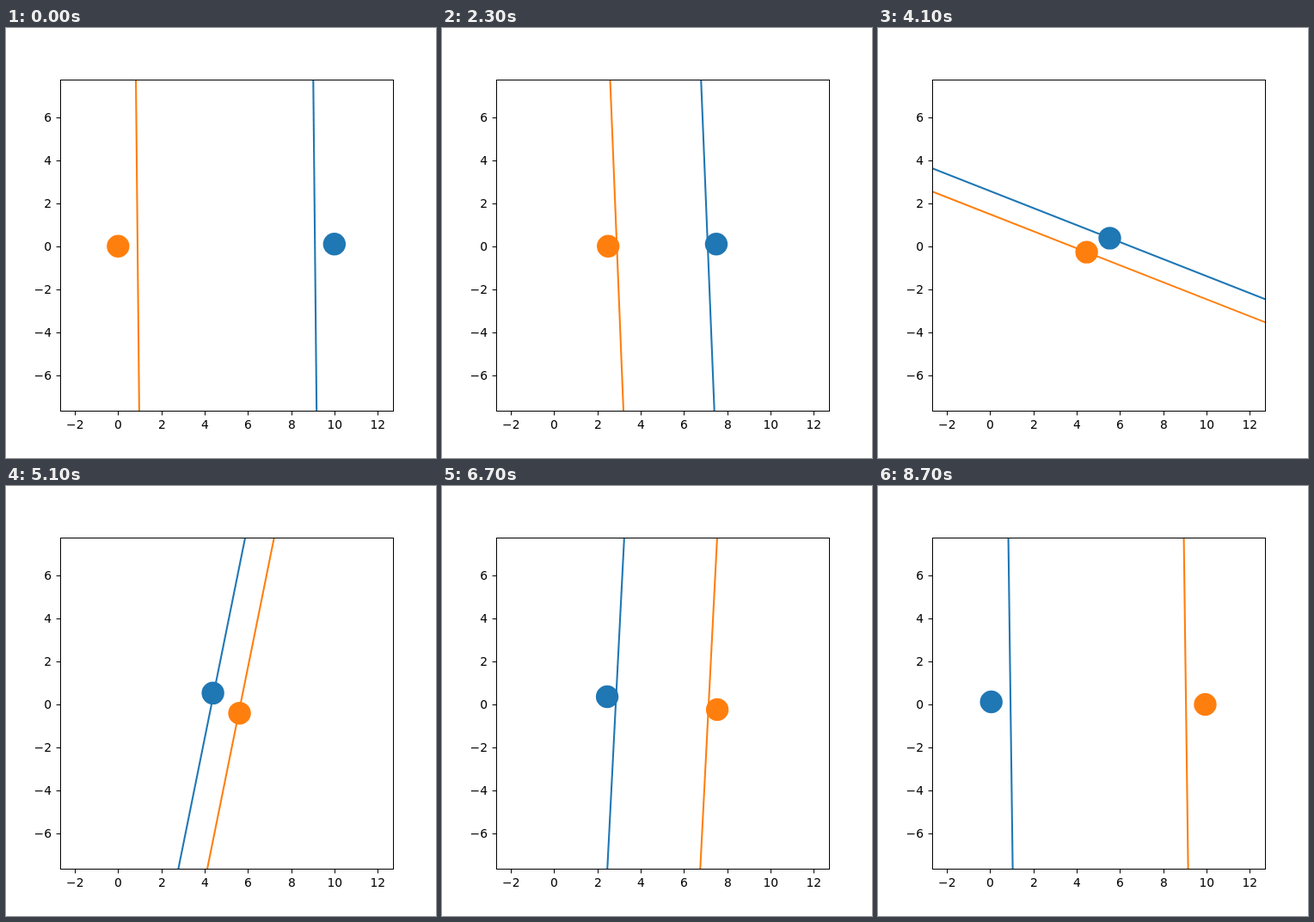
Write an HTML page with a canvas that moves like this. It is 500 px wide and 500 px high and loops after 8900 ms.

```html
<!DOCTYPE html>
<html lang="en">
<head>
<meta charset="utf-8">
<title>Two agents avoiding each other</title>
<style>
html, body { margin: 0; width: 100%; height: 100%; overflow: hidden; background: #fff; }
canvas { display: block; }
</style>
</head>
<body>
<canvas id="stage" width="500" height="500"></canvas>
<script>
const ctx = document.getElementById('stage').getContext('2d');
const BLUE = '#1f77b4', ORANGE = '#ff7f0e';
const STEPS = 42, FIRST = 500, STEP = 200, LOOP = FIRST + STEPS * STEP;
const SPEED = 0.25, HORIZON = 5, CONTACT = 0.1, REACH = 1;
const CENTER = [5, 0.05], GOAL = [10, 0];

const add = (a, b, k = 1) => [a[0] + k * b[0], a[1] + k * b[1]];
const mul = (a, k) => [a[0] * k, a[1] * k];
const dot = (a, b) => a[0] * b[0] + a[1] * b[1];
const det = (a, b) => a[0] * b[1] - a[1] * b[0];
const len = a => Math.hypot(...a);

// The speed limit is an octagon; each half-plane is dot(v, n) >= c
const limits = Array.from({ length: 8 }, (_, i) => {
  const a = (i + 0.5) * Math.PI / 4;
  return { n: [-Math.cos(a), -Math.sin(a)], c: -SPEED * Math.cos(Math.PI / 8) };
});

// Reciprocal avoidance line; the other agent mirrors this one through CENTER
function avoid(pos, vel) {
  const x = mul(add(CENTER, pos, -1), 2), v = mul(vel, 2);
  const d2 = dot(x, x), r2 = REACH * REACH;
  const near = mul(x, (1 - r2 / d2) / HORIZON);
  let n, u;
  if (d2 < r2 || dot(add(v, near, -1), near) < 0) {
    const t = d2 < r2 ? CONTACT : HORIZON;
    const w = add(v, x, -1 / t);
    n = mul(w, 1 / len(w));
    u = mul(n, REACH / t - len(w));
  } else {
    const leg = Math.sqrt(d2 - r2), s = det(v, x) < 0 ? -REACH : REACH;
    const side = mul([leg * x[0] + s * x[1], leg * x[1] - s * x[0]], 1 / d2);
    n = mul([side[1], -side[0]], Math.sign(s));
    u = mul(n, -dot(v, n));
  }
  const point = add(vel, u, 0.5);
  return { n, c: dot(point, n), at: add(pos, point) };
}

// Allowed velocity closest to the wanted one
function choose(want, planes) {
  const options = [want];
  planes.forEach((p, i) => {
    options.push(add(want, p.n, p.c - dot(want, p.n)));
    for (const q of planes.slice(i + 1)) {
      const d = det(p.n, q.n);
      if (Math.abs(d) > 1e-9)
        options.push([(p.c * q.n[1] - q.c * p.n[1]) / d, (p.n[0] * q.c - q.n[0] * p.c) / d]);
    }
  });
  const gap = v => len(add(v, want, -1));
  return options
    .filter(v => planes.every(p => dot(v, p.n) >= p.c - 1e-9))
    .sort((a, b) => gap(a) - gap(b))[0] || [0, 0];
}

function simulate() {
  const states = [];
  let pos = [0, 0], vel = [0, 0];
  for (let i = 0; i <= STEPS; i++) {
    const line = avoid(pos, vel);
    states.push({ pos, line });
    const way = add(GOAL, pos, -1), dist = len(way);
    vel = choose(mul(way, Math.min(SPEED, dist) / dist), [line, ...limits]);
    pos = add(pos, vel);
  }
  return states;
}

const px = ([x, y]) => [130.35 + 25.15 * x, 253.75 - 25 * y];
const mirror = p => add(mul(CENTER, 2), p, -1);

function disc(p, color) {
  ctx.fillStyle = color;
  ctx.beginPath();
  ctx.arc(...px(p), 13.2, 0, 2 * Math.PI);
  ctx.fill();
}

function stroke(a, b, color, width) {
  ctx.strokeStyle = color;
  ctx.lineWidth = width;
  ctx.beginPath();
  ctx.moveTo(...a);
  ctx.lineTo(...b);
  ctx.stroke();
}

function longLine(p, n, color) {
  const along = [-n[1], n[0]];
  stroke(px(add(p, along, -50)), px(add(p, along, 50)), color, 2.08);
}

function axes() {
  ctx.strokeStyle = ctx.fillStyle = '#000';
  ctx.lineWidth = 1;
  ctx.strokeRect(63.5, 60.5, 387, 385);
  ctx.font = '13.89px "DejaVu Sans", sans-serif';
  const label = v => String(v).replace('-', '\u2212');
  ctx.textAlign = 'center';
  for (let v = -2; v <= 12; v += 2) {
    const x = Math.round(px([v, 0])[0]) + 0.5;
    stroke([x, 445.5], [x, 450.4], '#000', 1);
    ctx.fillText(label(v), x - 0.2, 466);
  }
  ctx.textAlign = 'right';
  for (let v = -6; v <= 6; v += 2) {
    const y = Math.round(px([0, v])[1]) + 0.5;
    stroke([58.6, y], [63.5, y], '#000', 1);
    ctx.fillText(label(v), 53, y + 4.5);
  }
}

const states = simulate();

function draw(now) {
  const t = now % LOOP;
  const { pos, line } = states[t < FIRST ? 0 : Math.floor((t - FIRST) / STEP) + 1];
  ctx.fillStyle = '#fff';
  ctx.fillRect(0, 0, 500, 500);
  ctx.save();
  ctx.beginPath();
  ctx.rect(63, 60, 388, 386);
  ctx.clip();
  disc(mirror(pos), BLUE);
  disc(pos, ORANGE);
  longLine(mirror(line.at), line.n, BLUE);
  longLine(line.at, line.n, ORANGE);
  ctx.restore();
  axes();
}

const start = performance.now();
(function tick() {
  draw(performance.now() - start);
  requestAnimationFrame(tick);
})();
</script>
</body>
</html>
```
